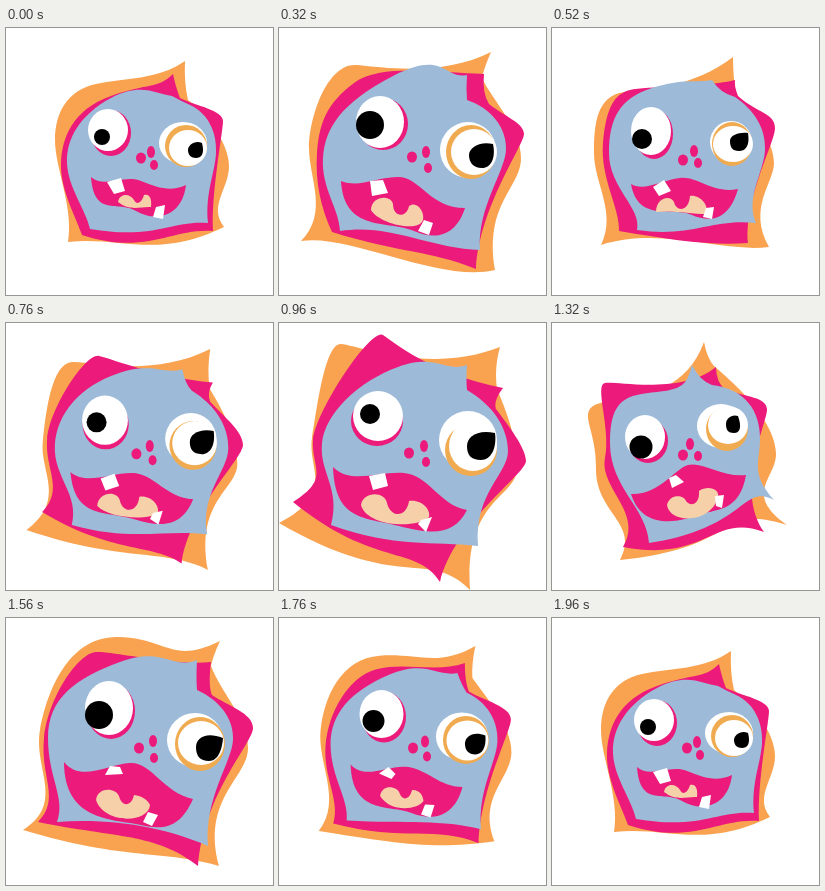
Recreate the animation shown at these times as an HTML page without scripts. Size 267 by 267 pixels, loop 2000 ms.

```html
<!DOCTYPE html>
<html lang="en">
<head>
<meta charset="utf-8">
<title>Wobbly monster</title>
<style>
html, body { margin: 0; width: 100%; height: 100%; overflow: hidden; background: #fff; }
svg { display: block; width: 100%; height: 100%; }
svg * { animation: 2s ease-in-out infinite; }
.orange { fill: #f9a350; }
.amber { fill: #f0ab50; }
.pink { fill: #ec1a7a; }
.blue { fill: #9dbbd8; }
.white { fill: #fff; }
.skin { fill: #f6d0a9; }

/* Head layers */
#back { animation-name: back; }
@keyframes back {
  0%, 98%, to { d: path("M179 33Q178 55 182 72C200 85 223 115 223 138S202 178 218 199C150 232 115 208 62 214C68 180 49 140 49 112S62 62 90 56S152 52 179 33Z"); }
  16% { d: path("M212 24Q205 40 203 50C215 75 242 100 242 130S205 175 216 242C160 255 70 205 22 213C50 185 30 150 30 120S48 34 78 37S165 48 212 24Z"); }
  26% { d: path("M181 29Q181 50 184 66C205 90 222 115 222 135S195 180 217 219C170 225 110 198 49 217C65 185 42 155 42 125S45 68 72 64S140 60 181 29Z"); }
  48% { d: path("M221 24Q215 45 218 66C228 90 238 115 238 145S185 175 191 267C150 230 110 270 54 202Q30 204 0 200C55 168 33 140 33 115S46 21 62 21S150 52 221 24Z"); d: path("M221 24Q215 45 218 66C228 90 238 115 238 145S185 175 191 267C150 225 120 270 0 200C58 170 28 145 33 115S46 20 62 21S150 52 221 24Z"); }
  66% { d: path("M152 19Q155 35 162 43C200 75 223 105 224 130S190 170 235 202C165 180 190 225 68 237C88 200 43 190 44 145S18 84 58 78S135 65 152 19Z"); }
  78% { d: path("M214 23Q207 38 205 48C215 75 242 100 242 130S195 180 213 248C160 232 120 243 17 212C60 185 27 150 34 112S62 18 112 19S165 47 214 23Z"); }
}
#mid { animation-name: mid; }
@keyframes mid {
  0%, 98%, to { d: path("M167 46Q170 60 174 70C190 78 217 82 217 93S205 165 207 203C165 200 140 228 76 207C68 185 54 160 55 135S66 82 105 68S150 62 167 46Z"); }
  16% { d: path("M205 46Q203 65 210 76C225 88 245 95 245 106S200 180 197 241C150 222 120 225 53 204C42 180 36 155 38 125S48 75 75 55S160 45 205 46Z"); }
  26% { d: path("M183 52Q182 58 186 68C205 85 223 85 223 100S192 170 196 215C160 218 120 212 67 203C68 180 48 150 51 115S62 66 78 62S150 60 183 52Z"); }
  48% { d: path("M224 65Q214 78 217 86C229 102 247 125 247 138S175 200 161 259C138 222 95 245 14 179C52 155 32 145 34 117S92 4 104 12S150 50 224 65Z"); }
  66% { d: path("M164 44Q164 60 174 67C195 74 214 74 215 86S182 165 212 209C160 190 155 240 71 224C92 190 47 165 53 135S42 62 53 60S130 72 164 44Z"); }
  78% { d: path("M205 44Q202 68 206 77C222 88 247 95 247 110S198 175 192 248C150 215 110 220 32 204C55 180 34 160 38 120S72 35 90 34S165 48 205 44Z"); }
}
#face { animation-name: face; }
@keyframes face {
  0%, 98%, to { d: path("M166 68Q175 73 184 77C203 86 211 105 210 125S199 165 202 195C165 192 150 212 84 201C80 182 62 160 61 135S75 86 105 70S150 66 166 68Z"); }
  16% { d: path("M188 47Q187 60 188 72C212 80 228 100 227 122S198 180 201 222C150 220 110 195 61 203C60 180 42 160 44 130S62 75 114 48S165 52 188 47Z"); }
  26% { d: path("M160 52Q168 65 183 69C202 82 214 100 213 122S193 170 204 195C160 190 140 210 85 202C90 180 57 160 57 125S68 70 100 60S145 55 160 52Z"); }
  48% { d: path("M188 42Q187 58 188 67C214 82 229 105 229 128S195 170 199 223C155 218 115 225 52 202C62 165 40 150 43 120S80 58 119 44S165 50 188 42Z"); }
  66% { d: path("M140 42Q148 58 160 62C195 66 208 90 208 115S198 150 222 177C190 160 195 205 97 220C95 185 58 165 58 120S75 72 105 69S135 58 140 42Z"); }
  78% { d: path("M191 42Q190 60 191 72C213 82 228 100 227 122S198 180 202 228C160 210 110 200 51 204C60 180 42 160 42 120S70 60 114 44S165 52 191 42Z"); }
}

/* Left eye */
#lid { animation-name: lid; }
@keyframes lid {
  0%, 98%, to { cx: 105px; cy: 105px; rx: 20px; ry: 23px; }
  16% { cx: 104px; cy: 96px; rx: 25px; ry: 26px; }
  26% { cx: 102px; cy: 106px; rx: 19px; ry: 25px; }
  48% { cx: 98px; cy: 98px; rx: 26px; ry: 25px; }
  66% { cx: 96px; cy: 118px; rx: 20px; ry: 22px; }
  78% { cx: 105px; cy: 93px; rx: 24px; ry: 28px; }
}
#ball { animation-name: ball; }
@keyframes ball {
  0%, 98%, to { cx: 102px; cy: 102px; rx: 20px; ry: 21px; }
  16% { cx: 101px; cy: 94px; rx: 24px; ry: 26px; }
  26% { cx: 99px; cy: 103px; rx: 20px; ry: 24px; }
  48% { cx: 99px; cy: 93px; rx: 25px; ry: 25px; }
  66% { cx: 93px; cy: 114px; rx: 20px; ry: 22px; }
  78% { cx: 103px; cy: 90px; rx: 24px; ry: 27px; }
}
#pupil { animation-name: pupil; }
@keyframes pupil {
  0%, 98%, to { cx: 96px; cy: 109px; r: 8px; }
  16% { cx: 91px; cy: 97px; r: 14px; }
  26% { cx: 90px; cy: 111px; r: 10px; }
  48% { cx: 91px; cy: 91px; r: 10px; }
  66% { cx: 89px; cy: 124px; r: 11.5px; }
  78% { cx: 93px; cy: 97px; r: 14px; }
}

/* Right eye */
#ball2 { animation-name: ball2; }
@keyframes ball2 {
  0%, 98%, to { cx: 177px; cy: 115px; rx: 24px; ry: 21px; }
  16% { cx: 189px; cy: 122px; rx: 28px; ry: 28px; }
  26% { cx: 179px; cy: 114px; rx: 21px; ry: 21px; }
  48% { cx: 189px; cy: 117px; rx: 29px; ry: 29px; }
  66% { cx: 169px; cy: 103px; rx: 24px; ry: 22px; }
  78% { cx: 189px; cy: 122px; rx: 28px; ry: 27px; }
}
#ring { animation-name: ring; }
@keyframes ring {
  0%, 98%, to { cx: 180px; cy: 118px; rx: 21px; ry: 21px; }
  16% { cx: 192px; cy: 124px; rx: 25px; ry: 27px; }
  26% { cx: 180px; cy: 116px; rx: 20px; ry: 22px; }
  48% { cx: 192px; cy: 127px; rx: 26px; ry: 26px; }
  66% { cx: 175px; cy: 106px; rx: 21px; ry: 22px; }
  78% { cx: 194px; cy: 126px; rx: 25px; ry: 27px; }
}
#inner { animation-name: inner; }
@keyframes inner {
  0%, 98%, to { cx: 182px; cy: 120px; rx: 19px; ry: 18px; }
  16% { cx: 195px; cy: 124px; rx: 23px; ry: 23px; }
  26% { cx: 181px; cy: 116px; rx: 20px; ry: 18px; }
  48% { cx: 194px; cy: 123px; rx: 24px; ry: 25px; }
  66% { cx: 176px; cy: 102px; rx: 20px; ry: 19px; }
  78% { cx: 195px; cy: 125px; rx: 23px; ry: 22px; }
}
#pupil2 { animation-name: pupil2; }
@keyframes pupil2 {
  0%, 98%, to { d: path("M196 115C199 126 195 130 190 130S182 127 182 122S189 112 196 115Z"); }
  16% { d: path("M214 116C217 130 212 140 203 140S190 134 190 127S200 113 214 116Z"); }
  26% { d: path("M196 105C198 117 194 123 187 123S178 119 178 113S187 104 196 105Z"); }
  48% { d: path("M216 110C218 125 212 137 202 137S188 132 188 123S198 106 216 110Z"); }
  66% { d: path("M186 93C190 104 188 110 182 110S174 107 174 101S180 91 186 93Z"); }
  78% { d: path("M217 120C216 132 212 143 203 143S190 138 190 129S200 113 217 120Z"); }
}

/* Nose */
#n1 { animation-name: n1; }
@keyframes n1 {
  0%, 98%, to { cx: 135px; cy: 130px; }
  16% { cx: 133px; cy: 129px; }
  26% { cx: 131px; cy: 132px; }
  48% { cx: 130px; cy: 130px; }
  66% { cx: 131px; cy: 132px; }
  78% { cx: 133px; cy: 130px; }
}
#n2 { animation-name: n2; }
@keyframes n2 {
  0%, 98%, to { cx: 145px; cy: 124px; }
  16% { cx: 147px; cy: 124px; }
  26% { cx: 142px; cy: 123px; }
  48% { cx: 145px; cy: 123px; }
  66% { cx: 138px; cy: 121px; }
  78% { cx: 147px; cy: 123px; }
}
#n3 { animation-name: n3; }
@keyframes n3 {
  0%, 98%, to { cx: 148px; cy: 137px; }
  16% { cx: 149px; cy: 140px; }
  26% { cx: 146px; cy: 135px; }
  48% { cx: 147px; cy: 139px; }
  66% { cx: 146px; cy: 133px; }
  78% { cx: 148px; cy: 140px; }
}

/* Mouth */
#mouth { animation-name: mouth; }
@keyframes mouth {
  0%, 98%, to { d: path("M85 149C98 161 118 146 135 153S165 164 180 157C176 190 148 194 130 183S88 190 85 149Z"); }
  16% { d: path("M62 153C80 160 95 150 118 149S150 180 186 180C178 205 160 214 135 203S65 205 62 153Z"); }
  26% { d: path("M79 156C92 164 110 152 128 150S160 166 186 161C178 190 160 196 140 187S86 195 79 156Z"); }
  48% { d: path("M54 144C72 162 100 148 125 150S160 182 188 187C175 212 155 212 120 203S56 198 54 144Z"); }
  66% { d: path("M79 171C108 172 122 146 136 142S172 155 194 152C188 188 165 186 150 191S92 212 79 171Z"); }
  78% { d: path("M58 144C75 165 102 146 124 145S156 174 187 181C175 208 160 213 135 207S58 205 58 144Z"); }
}
#tongue { animation-name: tongue; }
@keyframes tongue {
  0%, 98%, to { d: path("M112 174C114 164 125 166 128 172C131 178 136 174 138 167C144 165 146 172 145 179C135 178 125 184 112 174Z"); }
  16% { d: path("M92 182C92 168 112 166 114 176C114 190 128 190 130 178C138 172 146 184 144 192C140 205 100 196 92 182Z"); }
  26% { d: path("M104 184C104 170 118 166 122 174C124 184 137 184 138 168C146 166 158 176 154 186C140 186 120 182 104 184Z"); }
  48% { d: path("M82 182C84 168 106 168 108 180C112 196 128 194 130 178C142 176 152 186 150 194C138 206 88 204 82 182Z"); }
  66% { d: path("M115 182C118 170 132 172 134 178C138 184 148 182 147 168C156 162 168 166 166 174C160 200 118 202 115 182Z"); }
  78% { d: path("M90 182C92 168 110 170 113 178C116 190 126 188 128 177C136 178 142 182 144 187C142 206 98 206 90 182Z"); }
}
#t1 { animation-name: t1; }
@keyframes t1 {
  0%, 98%, to { d: path("M101 154L115 150L119 163L108 166Z"); }
  16% { d: path("M91 153L104 152L109 165L93 168Z"); }
  26% { d: path("M101 159L112 152L119 163L107 168Z"); }
  48% { d: path("M90 153L106 150L109 163L94 167Z"); }
  66% { d: path("M117 155L124 152L132 159L120 165Z"); }
  78% { d: path("M99 157L104 148L114 149L117 156Z"); }
}
#t2 { animation-name: t2; }
@keyframes t2 {
  0%, 98%, to { d: path("M150 179L159 177L157 191L147 189Z"); }
  16% { d: path("M145 192L154 195L150 207L139 203Z"); }
  26% { d: path("M154 180L162 179L160 191L151 189Z"); }
  48% { d: path("M142 197L153 194L147 209L139 201Z"); }
  66% { d: path("M163 173L172 172L170 185L164 183Z"); }
  78% { d: path("M142 194L152 197L146 208L137 204Z"); }
}
</style>
</head>
<body>
<svg viewBox="0 0 267 267">
  <path id="back" class="orange"/>
  <path id="mid" class="pink"/>
  <path id="face" class="blue"/>

  <ellipse id="lid" class="pink"/>
  <ellipse id="ball" class="white"/>
  <circle id="pupil"/>

  <ellipse id="ball2" class="white"/>
  <ellipse id="ring" class="amber"/>
  <ellipse id="inner" class="white"/>
  <path id="pupil2"/>

  <ellipse id="n1" class="pink" rx="5" ry="5.5"/>
  <ellipse id="n2" class="pink" rx="4" ry="6"/>
  <ellipse id="n3" class="pink" rx="4" ry="5"/>

  <path id="mouth" class="pink"/>
  <path id="tongue" class="skin"/>
  <path id="t1" class="white"/>
  <path id="t2" class="white"/>
</svg>
</body>
</html>
```
